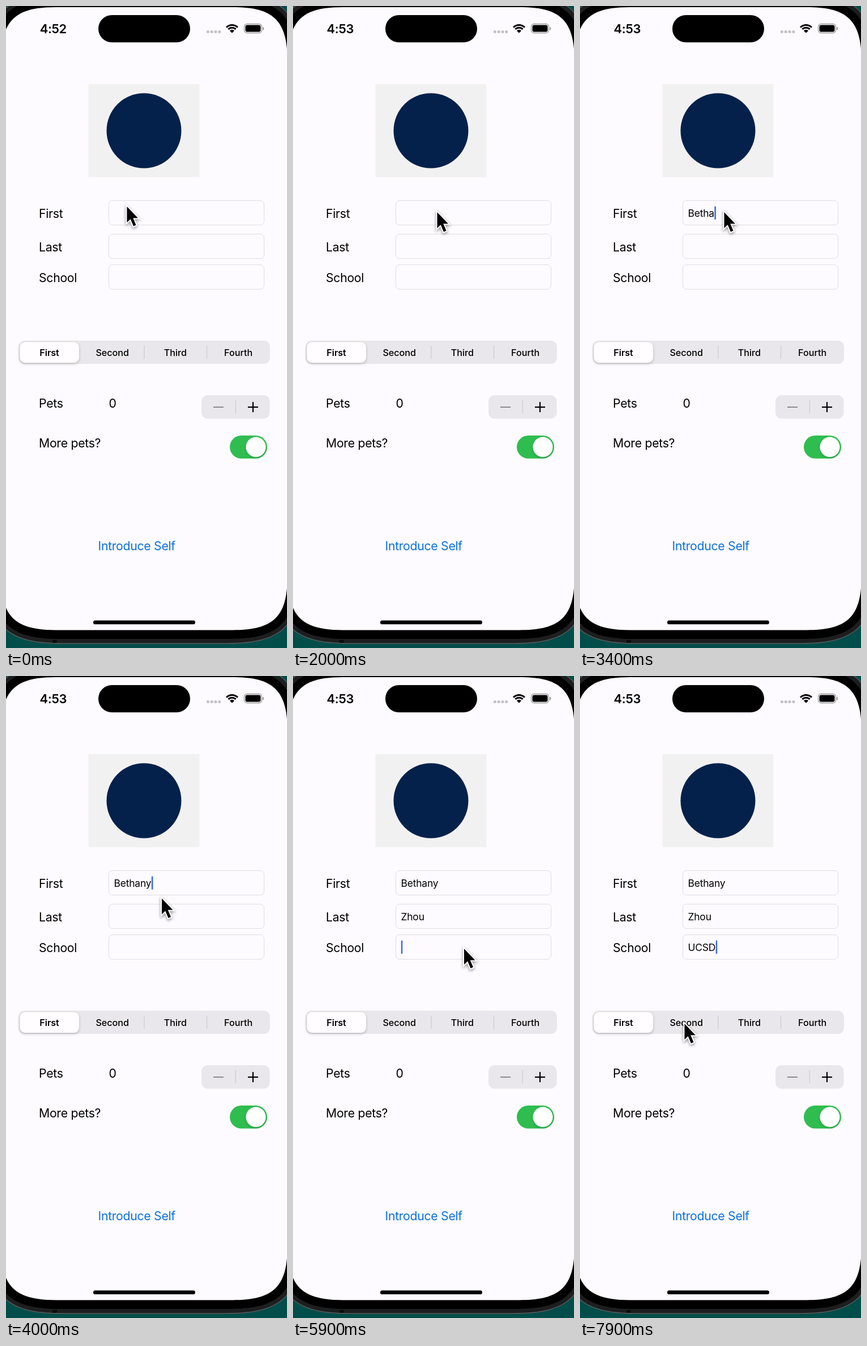
An HTML page with a canvas that plays this animation: 496 px wide and 1130 px high, repeating every 8 s.

```html
<!DOCTYPE html>
<html lang="en">
<head>
<meta charset="utf-8">
<title>Introduction form</title>
<style>
  html, body { margin: 0; width: 100%; height: 100%; overflow: hidden; background: #014d4a; }
  canvas { display: block; width: 496px; height: 1130px; }
</style>
</head>
<body>
<canvas id="stage" width="496" height="1130"></canvas>
<script>
const ctx = document.getElementById('stage').getContext('2d');
const LOOP = 8000, STEP = 100;
const PAPER = '#fdfbff', GREY = '#e9e7eb', RULE = '#cfcdd2', INK = '#000';

// Each field: top edge, focus time, text and the time of each key press.
const fields = [
  { label: 'First', top: 342.5, focus: 2200, text: 'Bethany', keys: [2600, 2800, 3000, 3200, 3300, 3500, 3600] },
  { label: 'Last', top: 401.5, focus: 4300, text: 'Zhou', keys: [4500, 4700, 4900, 5100] },
  { label: 'School', top: 455.5, focus: 5800, text: 'UCSD', keys: [6300, 6500, 6700, 6900] }
];

// Pointer path: time, x, y.
const path = [
  [0, 213.5, 353], [200, 228.5, 354], [300, 228.5, 354], [400, 228.5, 357],
  [800, 228.5, 357], [1300, 254.5, 363], [3600, 254.5, 363], [3900, 273, 389],
  [4000, 275, 391.5], [4300, 294, 425], [5300, 294, 425], [5700, 302, 480],
  [6100, 302, 480], [6700, 351, 546], [7200, 351, 546], [7900, 184.5, 612]
];

function paint(fill, stroke, line) {
  if (fill) { ctx.fillStyle = fill; ctx.fill(); }
  if (stroke) { ctx.strokeStyle = stroke; ctx.lineWidth = line; ctx.stroke(); }
}

function box(x, y, w, h, r, fill, stroke, line = 1) {
  ctx.beginPath();
  ctx.roundRect(x, y, w, h, r);
  paint(fill, stroke, line);
}

// Rectangle whose corners ease into the sides.
function smoothBox(l, t, r, b, radius, fill, stroke, line = 1) {
  const s = radius * 1.35, c = radius * 0.331;
  ctx.beginPath();
  ctx.moveTo(l + s, t);
  ctx.lineTo(r - s, t);
  ctx.bezierCurveTo(r - c, t, r, t + c, r, t + s);
  ctx.lineTo(r, b - s);
  ctx.bezierCurveTo(r, b - c, r - c, b, r - s, b);
  ctx.lineTo(l + s, b);
  ctx.bezierCurveTo(l + c, b, l, b - c, l, b - s);
  ctx.lineTo(l, t + s);
  ctx.bezierCurveTo(l, t + c, l + c, t, l + s, t);
  ctx.closePath();
  paint(fill, stroke, line);
}

function disc(x, y, r, fill) {
  ctx.beginPath();
  ctx.arc(x, y, r, 0, Math.PI * 2);
  paint(fill);
}

function rule(x1, y1, x2, y2, color, line) {
  ctx.beginPath();
  ctx.moveTo(x1, y1);
  ctx.lineTo(x2, y2);
  paint(null, color, line);
}

function text(str, x, y, { size = 21.3, weight = 400, track = -0.33, color = INK, align = 'left' } = {}) {
  ctx.font = `${weight} ${size}px Inter, "Liberation Sans", sans-serif`;
  ctx.letterSpacing = track + 'px';
  ctx.textAlign = align;
  ctx.fillStyle = color;
  ctx.fillText(str, x, y);
  return ctx.measureText(str).width;
}

function shadow(color, blur, dy) {
  ctx.shadowColor = color;
  ctx.shadowBlur = blur;
  ctx.shadowOffsetY = dy;
}

function drawPhone() {
  ctx.fillStyle = '#014d4a';
  ctx.fillRect(0, 0, 496, 1130);
  smoothBox(-32, -21, 520, 1122, 96, '#1d1e1f', '#58595a', 1.4);
  box(82, 1116, 8, 5, 1, '#0b0b0b');
  smoothBox(-24, -13, 512, 1114, 88, '#000');
  smoothBox(-9, 2, 497, 1098.5, 72, PAPER);
  box(163, 16, 162, 48, 24, '#000');
  box(154, 1081.5, 180, 6.8, 3.4, '#000');
}

function drawWifi(x, y) {
  const a = Math.PI / 4, up = -Math.PI / 2;
  for (const r of [14, 9.3]) {
    ctx.beginPath();
    ctx.arc(x, y, r, up - a, up + a);
    paint(null, INK, 3);
  }
  ctx.beginPath();
  ctx.moveTo(x, y);
  ctx.arc(x, y, 5.8, up - a, up + a);
  paint(INK);
}

function drawStatus(t) {
  text(t < 700 ? '4:52' : '4:53', 83.3, 48, { size: 22, weight: 600, track: -0.4, align: 'center' });
  for (let i = 0; i < 4; i++) box(354 + i * 6.8, 43, 4.8, 4.8, 1.6, '#c2c0c5');
  drawWifi(399, 47.5);
  box(420.5, 31.5, 31, 16, 5, null, '#9b9a9d', 1.3);
  box(422.5, 33.5, 27, 12, 3.3, INK);
  box(453, 37, 2, 5.5, 1, '#9b9a9d');
}

function drawField({ label, top, focus, text: full, keys }, t, blur) {
  text(label, 58, top + 30.5);
  box(181.5, top, 274, 43, 6.5, PAPER, '#dfdde2');
  const count = keys.filter(k => k <= t).length;
  const width = text(full.slice(0, count), 190.4, top + 28, { size: 17.5, track: -0.2 });
  if (t < focus || t >= blur) return;
  const since = t - (count ? keys[count - 1] : focus);
  if (since % 1000 < 500) box(190.8 + width, top + 10, 2.6, 23.5, 1.2, '#3c6fd6');
}

function drawSegments() {
  box(22, 589, 444, 41, 11, GREY);
  ctx.save();
  shadow('rgba(0,0,0,.22)', 5, 2);
  box(24.5, 591.5, 104.5, 36.5, 9, '#fffdff');
  ctx.restore();
  rule(244, 598, 244, 621, RULE, 1.3);
  rule(354.5, 598, 354.5, 621, RULE, 1.3);
  ['First', 'Second', 'Third', 'Fourth'].forEach((name, i) =>
    text(name, 76.5 + i * 111.2, 615.5, { size: 16.2, weight: i ? 500 : 600, track: -0.05, align: 'center' }));
}

function drawPets() {
  text('Pets', 58, 707);
  text('0', 181.4, 707);
  box(345, 685, 120.5, 41.5, 11, GREY);
  rule(405.3, 694, 405.3, 717, RULE, 1.3);
  rule(366, 706, 384, 706, '#8b8a8d', 2);
  rule(427, 706, 445, 706, INK, 2.2);
  rule(436, 697, 436, 715, INK, 2.2);
  text('More pets?', 58, 777);
  box(395, 756, 66, 40.5, 20.2, '#2fbd50');
  ctx.save();
  shadow('rgba(0,0,0,.18)', 4, 2);
  disc(441, 776.2, 17.6, '#fff');
  ctx.restore();
}

function pointerAt(t) {
  const i = path.findIndex(p => p[0] > t);
  if (i < 0) return path[path.length - 1].slice(1);
  const [t0, x0, y0] = path[i - 1], [t1, x1, y1] = path[i];
  const u = (t - t0) / (t1 - t0), e = u * u * (3 - 2 * u);
  return [x0 + (x1 - x0) * e, y0 + (y1 - y0) * e];
}

function drawPointer([x, y]) {
  const arrow = new Path2D('M0 0V28L6.2 22L11.5 34.5L16 32.5L10.8 20.3H19.5Z');
  ctx.save();
  ctx.translate(x, y);
  ctx.lineWidth = 4;
  ctx.strokeStyle = '#fff';
  ctx.save();
  shadow('rgba(0,0,0,.45)', 5, 2);
  ctx.stroke(arrow);
  ctx.restore();
  ctx.fillStyle = INK;
  ctx.fill(arrow);
  ctx.restore();
}

function draw(t) {
  drawPhone();
  drawStatus(t);
  box(145.5, 137.5, 196, 164, 0, '#f2f1f2');
  disc(243.5, 219.5, 66, '#04214b');
  fields.forEach((f, i) => drawField(f, t, fields[i + 1]?.focus ?? LOOP));
  drawSegments();
  drawPets();
  text('Introduce Self', 162.5, 958, { color: '#0b70d9' });
  drawPointer(pointerAt(t));
}

const start = performance.now();
function tick() {
  const t = (performance.now() - start) % LOOP;
  draw(Math.floor(t / STEP) * STEP);
  requestAnimationFrame(tick);
}
tick();
</script>
</body>
</html>
```
